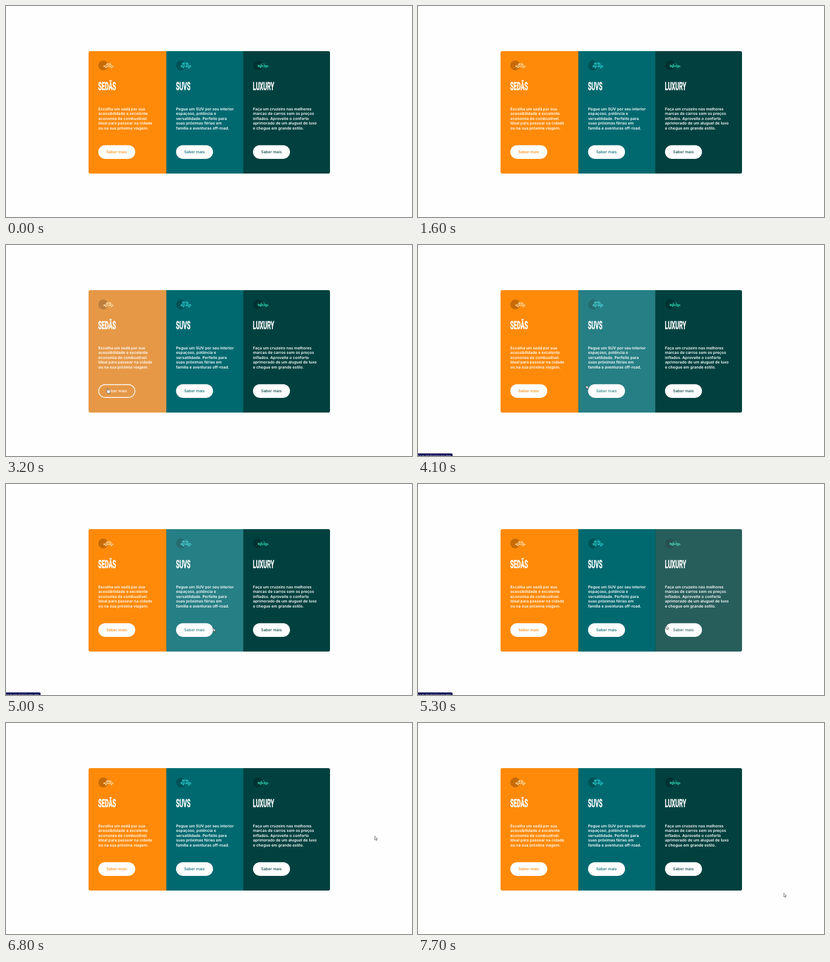
Animation of 718 by 374 pixels, one loop 8 s. Source, as an HTML page:

```html
<!DOCTYPE html>
<html lang="pt">
<head>
<meta charset="utf-8">
<title>Carros</title>
<style>
html, body { margin: 0; width: 100%; height: 100%; overflow: hidden; background: #fefefe; }
svg { display: block; width: 718px; height: 374px; font-family: Inter, "Open Sans", sans-serif; text-rendering: geometricPrecision; }

.card { --bg: var(--c); --face: #fff; --ink: var(--c); }
.card .bg { fill: var(--bg); }
.card text { fill: #fff; font-size: 6.9px; font-weight: 600; }
.card .title { font-family: Roboto, Inter, sans-serif; font-size: 19.8px; font-weight: 700; stroke: #fff; stroke-width: .5px; }
.card .button rect { fill: var(--face); stroke: #fff; stroke-width: 1.4px; }
.card .button text { fill: var(--ink); font-weight: 500; }
.card, .button, .arrow, .hand, .status { animation: 8s step-end infinite; }

#card0 { --c: #ff8a0a; --icon: #ffcf8e; animation-name: hover0; }
#card1 { --c: #006970; --icon: #1fb0b3; animation-name: hover1; }
#card2 { --c: #00413f; --icon: #1fa58c; animation-name: hover2; }
#card0 .button { animation-name: press0; }
#card1 .button { animation-name: press1; }
#card2 .button { animation-name: press2; }

@keyframes hover0 {
  0%, 49.4% { opacity: 1; --bg: #ff8a0a; }
  32.5% { opacity: .85; --bg: #e28625; }
}
@keyframes hover1 { 0%, 64.4% { opacity: 1; } 49.4% { opacity: .85; } }
@keyframes hover2 { 0%, 74.4% { opacity: 1; } 64.4% { opacity: .85; } }
@keyframes press0 {
  0%, 46.3% { --face: #fff; --ink: #ff8a0a; }
  34.4% { --face: none; --ink: #fff; }
}
@keyframes press1 {
  0%, 62% { --face: #fff; --ink: #006970; }
  54% { --face: none; --ink: #fff; }
}
@keyframes press2 {
  0%, 72.5% { --face: #fff; --ink: #00413f; }
  67.5% { --face: none; --ink: #fff; }
}

.arrow { animation-name: arrow; }
.hand { opacity: 0; animation-name: hand; }
@keyframes arrow {
  0%, 46.3%, 62%, 72.5% { opacity: 1; }
  34.4%, 54%, 67.5% { opacity: 0; }
}
@keyframes hand {
  0%, 46.3%, 62%, 72.5% { opacity: 0; }
  34.4%, 54%, 67.5% { opacity: 1; }
}

.cursor { fill: #fff; stroke: #222; stroke-width: .6px; stroke-linejoin: round; animation: move 8s linear infinite; }
@keyframes move {
  0%, 20% { transform: translate(134px, -14px); }
  21.25% { transform: translate(130px, 0); }
  23.75% { transform: translate(97px, 40px); }
  26.25% { transform: translate(76px, 130px); }
  28.75% { transform: translate(88px, 180px); }
  30% { transform: translate(105px, 208px); }
  32.5% { transform: translate(148px, 238px); }
  34.4% { transform: translate(167px, 250px); }
  37.5%, 42.5% { transform: translate(178.5px, 253.5px); }
  46.3% { transform: translate(228px, 252px); }
  49.4% { transform: translate(283.5px, 249px); }
  51.25% { transform: translate(297px, 248px); }
  54% { transform: translate(312px, 253px); }
  57.5%, 61.25% { transform: translate(330px, 257px); }
  64.4% { transform: translate(420px, 252px); }
  66.25% { transform: translate(438.5px, 250.5px); }
  68.75%, 71.25% { transform: translate(455px, 256px); }
  74.4% { transform: translate(572px, 190px); }
  76.25% { transform: translate(613.5px, 159px); }
  82.5% { transform: translate(640px, 176px); }
  85% { transform: translate(652px, 200px); }
  91.25% { transform: translate(647px, 300px); }
  96%, 100% { transform: translate(646.5px, 301px); }
}

.status { opacity: 0; animation-name: status; }
.status text { font-size: 4.7px; fill: #fff; }
@keyframes status { 0%, 80% { opacity: 0; } 43.75% { opacity: 1; } }
</style>
</head>
<body>
<svg viewBox="0 0 718 374">
  <clipPath id="panel"><rect x="146" y="80" width="427" height="217" rx="3"/></clipPath>
  <g id="cards" clip-path="url(#panel)"></g>
  <g class="status">
    <path d="M0 369.4H59.5Q61 369.4 61 371V374H0Z" fill="#00004d"/>
    <text x="0" y="375">local-site:8000/home.html</text>
  </g>
  <g class="cursor">
    <path class="arrow" d="M.2 .2V7L1.8 5.6L2.9 8.1L4 7.6L2.9 5.2H5.1Z"/>
    <path class="hand" d="M.2 .8Q1 -.4 1.8 .8V3.4L4.8 4.1Q5.8 4.3 5.7 5.4L5.1 9.4H1.1L-1.6 6Q-1.4 4.7 .2 5.9Z"/>
  </g>
</svg>
<script>
// Each card reaches slightly under the next, so no seam shows between them.
const cards = [
  {
    left: 146, right: 284, title: 'SEDÃS',
    lines: ['Escolha um sedã por sua', 'acessibilidade e excelente', 'economia de combustível.',
      'Ideal para passear na cidade', 'ou na sua próxima viagem.'],
    body: 'M4-.9L6-3.5Q6.4-4 7-4H9.3V-.9ZM10.2-4H12Q12.8-4 13.3-3.5L15-.9H10.2Z' +
      'M.5 0H9.3V2.9H7.2A2.4 2.4 0 0 0 2.6 2.9H.5ZM10.2 0H16Q18.2.3 18.2 1.5V2.9H16.7A2.4 2.4 0 0 0 12.1 2.9H10.2Z',
    wheels: [4.9, 14.4], axle: 3.3, hub: 1.5
  },
  {
    left: 283.5, right: 420, title: 'SUVS',
    lines: ['Pegue um SUV por seu interior', 'espaçoso, potência e', 'versatilidade. Perfeito para',
      'suas próximas férias em', 'família e aventuras off-road.'],
    body: 'M1.5-1.3L2.2-4.5H7V-1.3ZM8-4.5H12L14.3-1.3H8ZM2-5.6H11.5V-5H2Z' +
      'M-.6-.4H7.3V3H6.8A2.6 2.6 0 0 0 1.8 3H-.6ZM8.2-.4H16.5Q18 0 18 1.2V3H16.6A2.6 2.6 0 0 0 11.6 3H8.2Z',
    wheels: [4.3, 14.1], axle: 3.5, hub: 1.8
  },
  {
    left: 419.6, right: 573, title: 'LUXURY',
    lines: ['Faça um cruzeiro nas melhores', 'marcas de carros sem os preços', 'inflados. Aproveite o conforto',
      'aprimorado de um aluguel de luxo', 'e chegue em grande estilo.'],
    body: 'M4.5-.9L5-2.8H6.8L7.7-.9ZM9-3.7H10.4L13.3-.9H11.5Z' +
      'M-.4-1.6L3-.4H9V2.8H7A2.4 2.4 0 0 0 2.4 2.8H-.4ZM9.9-.4H16Q18.6 0 18.6 2.8H16.7A2.4 2.4 0 0 0 12.1 2.8H9.9Z',
    wheels: [4.7, 14.4], axle: 2.8, hub: 1.6
  }
];

const icon = (x, { body, wheels, axle, hub }) => `
  <g transform="translate(${x + 8.8} 105.4)">
    <circle r="8.8" fill="#000" fill-opacity=".22"/>
    <g fill="var(--icon)"><path d="${body}"/>
    ${wheels.map(cx => `<circle cx="${cx}" cy="${axle}" r="${hub}"/>`).join('')}</g>
  </g>`;

const card = (c, i) => {
  const x = c.left + 17.2;
  return `
  <g class="card" id="card${i}">
    <rect class="bg" x="${c.left}" y="80" width="${c.right - c.left}" height="217"/>
    ${icon(x, c)}
    <text class="title" transform="translate(${x - .3} 149.1) scale(.515 1)">${c.title}</text>
    ${c.lines.map((line, n) => `<text x="${x}" y="${184.6 + n * 8.55}">${line}</text>`).join('')}
    <g class="button">
      <rect x="${x + .7}" y="247.5" width="64" height="22.7" rx="11.35"/>
      <text x="${x + 14.2}" y="261.3">Saber mais</text>
    </g>
  </g>`;
};

document.getElementById('cards').innerHTML = cards.map(card).join('');
</script>
</body>
</html>
```
